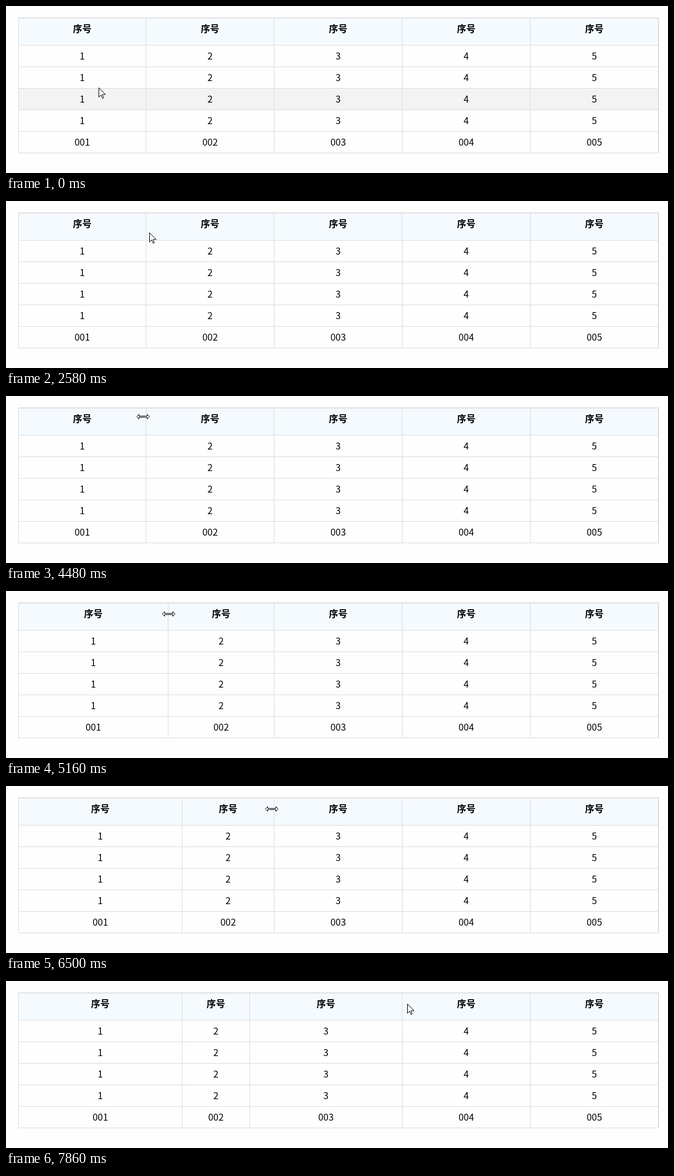
Recreate the animation shown at these times as an HTML page with a canvas. Size 1137 by 287 pixels, loop 7990 ms.

```html
<!DOCTYPE html>
<html lang="zh">
<head>
<meta charset="utf-8">
<title>Resizable table</title>
<style>
  html, body { margin: 0; width: 100%; height: 100%; overflow: hidden; background: #fefefe; }
  canvas { display: block; }
</style>
</head>
<body>
<canvas id="stage" width="1137" height="287"></canvas>
<script>
const ctx = document.getElementById('stage').getContext('2d', { alpha: false });
const LOOP = 7990;
const TOP = 20, HEAD_BOTTOM = 67, ROW = 37, ROWS = 5, COLUMNS = 5, LEFT = 21, COLUMN = 220;
const RIGHT = LEFT - 1 + COLUMN * COLUMNS;
const BOTTOM = HEAD_BOTTOM + ROW * ROWS;
const FONT = '16px "Noto Sans CJK SC", "Noto Sans CJK", "Noto Sans", sans-serif';

// Pointer gestures, each a cubic curve from the previous end point;
// a gesture with a column drags that column's right edge.
const home = [159, 140];
const moves = [
  { start: 150, end: 1090, steps: 8, to: [100, 81], via: [[245, 0], [-115, 0]] },
  { start: 1240, end: 2150, steps: 8, to: [85, 70], via: [[88, 255], [84, 255]] },
  { start: 2300, end: 2580, steps: 3, to: [246, 54] },
  { start: 2730, end: 3240, steps: 5, to: [242, 44] },
  { start: 3360, end: 3360, steps: 1, to: [242, 42] },
  { start: 3670, end: 3820, steps: 2, to: [235, 39] },
  { start: 4100, end: 4480, steps: 4, to: [235, 35], via: [[222, 38], [238, 39]] },
  { start: 4890, end: 5430, steps: 5, to: [297, 39], via: [[265, 39], [286, 39]], column: 0 },
  { start: 5800, end: 6500, steps: 6, to: [456, 39], via: [[360, 45], [500, 44]] },
  { start: 6780, end: 7050, steps: 3, to: [414, 39], column: 1 },
  { start: 7180, end: 7710, steps: 5, to: [675, 39], via: [[500, 44], [640, 42]] },
  { start: 7860, end: 7860, steps: 1, to: [689, 39] }
];

function pointOn(from, { to, via = [from, to] }, p) {
  const q = 1 - p;
  return from.map((a, k) => Math.round(
    q * q * q * a + 3 * q * q * p * via[0][k] + 3 * q * p * p * via[1][k] + p * p * p * to[k]));
}

function stateAt(time) {
  const edges = Array.from({ length: COLUMNS }, (_, i) => LEFT - 1 + COLUMN * (i + 1));
  let from = home, point = home, dragging = false;
  for (const move of moves) {
    if (time < move.start) break;
    const { start, end, steps, to, column } = move;
    const index = steps > 1 ? Math.floor((time - start + 1) / (end - start) * (steps - 1)) : 0;
    const p = Math.min(1, (index + 1) / steps);
    point = pointOn(from, move, p);
    dragging = column !== undefined;
    if (dragging) {
      // The edge trails the pointer and catches up on release.
      const trail = Math.max(0, p - 0.25 * (1 - p));
      edges[column] += pointOn(from, move, trail)[0] - from[0];
    }
    from = to;
  }
  const [x, y] = point;
  const nearEdge = edges.some(edge => x >= edge - 9 && x <= edge);
  return { x, y, edges, resizing: dragging || (y < HEAD_BOTTOM && nearEdge) };
}

function rect(color, x, y, w, h) {
  ctx.fillStyle = color;
  ctx.fillRect(x, y, w, h);
}

function drawTable({ y, edges }) {
  const width = RIGHT - LEFT, height = BOTTOM - TOP + 1;
  rect('#fefefe', 0, 0, 1137, 287);
  rect('#f5faff', LEFT, TOP, width, HEAD_BOTTOM - TOP);
  const hovered = Math.floor((y + 2 - HEAD_BOTTOM) / ROW);
  if (hovered >= 0 && hovered < ROWS) {
    rect('#f3f3f3', LEFT, HEAD_BOTTOM + hovered * ROW, width, ROW);
  }

  for (let r = 0; r <= ROWS; r++) rect('#dcdcdc', LEFT, HEAD_BOTTOM + r * ROW, width + 1, 1);
  for (const x of [LEFT, ...edges]) rect('#dcdcdc', x, TOP, 1, height);
  rect('#cacaca', LEFT, TOP, width + 1, 1);
  rect('#cacaca', RIGHT, TOP, 1, height);

  ctx.fillStyle = '#000';
  ctx.textAlign = 'center';
  edges.forEach((edge, i) => {
    const center = ((i ? edges[i - 1] : LEFT) + edge + 1) / 2;
    ctx.font = 'bold ' + FONT;
    ctx.fillText('序号', center, 45);
    ctx.font = FONT;
    for (let r = 0; r < ROWS; r++) {
      const label = r < ROWS - 1 ? `${i + 1}` : `00${i + 1}`;
      ctx.fillText(label, center, HEAD_BOTTOM + r * ROW + 25);
    }
  });
}

const arrow = new Path2D('M0 0V16L3.7 12.4L6.2 18.2L8.3 17.3L5.9 11.6H11.3Z');
const resizer = new Path2D('M-11 0L-7 -4V-1H7V-4L11 0L7 4V1H-7V4Z');

function drawPointer({ x, y, resizing }) {
  const shape = resizing ? resizer : arrow;
  ctx.save();
  ctx.translate(x + 0.5, y + 0.5);
  ctx.fillStyle = '#fff';
  ctx.strokeStyle = '#000';
  ctx.fill(shape);
  ctx.stroke(shape);
  ctx.restore();
}

function frame() {
  const state = stateAt(performance.now() % LOOP);
  drawTable(state);
  drawPointer(state);
  requestAnimationFrame(frame);
}
frame();
</script>
</body>
</html>
```
